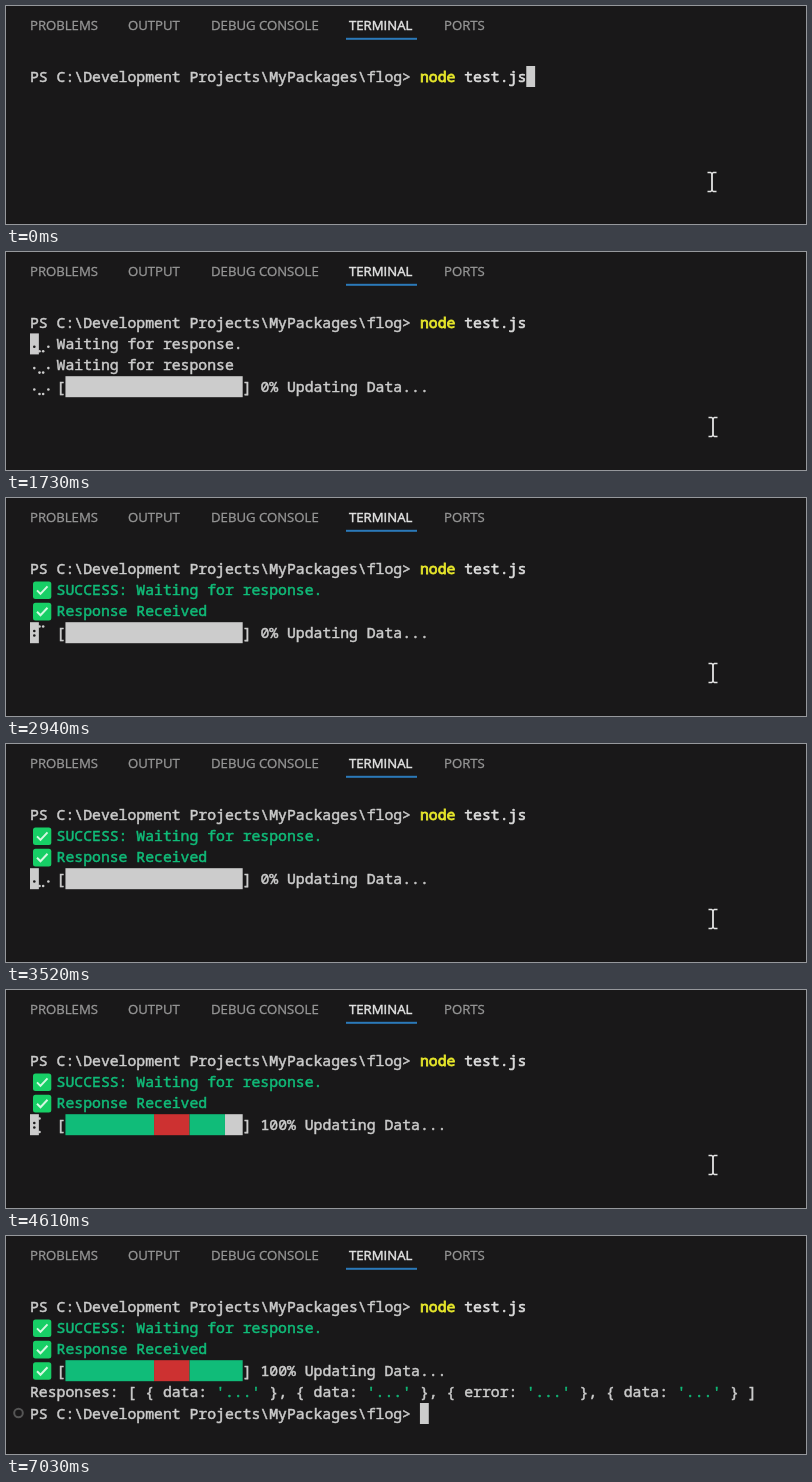
An HTML page with a canvas for the animation above (7.09 s loop, 800 px wide and 218 px high).

```html
<!DOCTYPE html>
<html lang="en">
<head>
<meta charset="utf-8">
<title>Terminal progress demo</title>
<style>
  html, body { margin: 0; width: 100%; height: 100%; overflow: hidden; background: #191819; }
  canvas { display: block; }
</style>
</head>
<body>
<canvas id="stage" width="800" height="218"></canvas>
<script>
const ctx = document.getElementById('stage').getContext('2d');

const LOOP = 7090, LEFT = 24, TOP = 59.6, CELL = 8.862, ROW = 21.4;
const COLOR = {
  back: '#191819', text: '#cccccc', dim: '#969696', bright: '#e4e4e4', accent: '#2b79b9',
  yellow: '#e9e92b', green: '#10bc79', red: '#cd3131', check: '#17cf66', ring: '#555555'
};
const MONO = '500 14.77px "Noto Sans Mono", monospace';
const SANS = '13.15px "Open Sans", sans-serif';
const PROMPT = 'PS C:\\Development Projects\\MyPackages\\flog> ';
const TABS = [['PROBLEMS', 24], ['OUTPUT', 122], ['DEBUG CONSOLE', 205], ['TERMINAL', 343], ['PORTS', 438]];
const SPINNER = ['⢎⠀', '⠎⠁', '⠊⠑', '⠈⠱', '⠀⡱', '⢀⡰', '⢄⡠', '⢆⡀'];
// Column and row of each braille dot, in bit order
const DOTS = [[0, 0], [0, 1], [0, 2], [1, 0], [1, 1], [1, 2], [0, 3], [1, 3]];

const TICK = 109.4, TICK_ORIGIN = 1053;
const tickTime = n => TICK_ORIGIN + n * TICK;
const TIME = {
  mouseMove: 760, enter: 1090, start: tickTime(3), first: tickTime(14), second: tickTime(16),
  done: tickTime(33) + 35, mouseHide: 5820
};

const colX = col => LEFT + col * CELL;
const rowY = row => TOP + row * ROW;

function rect(x, y, w, h, color) {
  ctx.fillStyle = color;
  ctx.fillRect(x, y, w, h);
}

// A thin outline thickens the strokes of the letters
function label(text, x, y, font, color, outline) {
  ctx.font = font;
  ctx.fillStyle = ctx.strokeStyle = color;
  ctx.lineWidth = outline;
  ctx.fillText(text, x, y);
  ctx.strokeText(text, x, y);
}

function write(row, col, text, color = COLOR.text, outline = 0.5) {
  label(text, colX(col), rowY(row) + 16, MONO, color, outline);
}

function cells(row, from, to, color) {
  rect(colX(from), rowY(row) + 0.4, (to - from) * CELL, ROW - 0.4, color);
}

const cursor = (row, col) => cells(row, col, col + 1, COLOR.text);

function line(points, color, width) {
  ctx.strokeStyle = color;
  ctx.lineWidth = width;
  ctx.beginPath();
  points.forEach(([x, y]) => ctx.lineTo(x, y));
  ctx.stroke();
}

function drawTabs() {
  for (const [name, x] of TABS) {
    const active = name === 'TERMINAL';
    label(name, x, 24, SANS, active ? COLOR.bright : COLOR.dim, active ? 0.45 : 0.3);
  }
  rect(340, 31.8, 71, 2, COLOR.accent);
}

function drawCheck(row) {
  const y = rowY(row) + 2.4;
  ctx.fillStyle = COLOR.check;
  ctx.beginPath();
  ctx.roundRect(27, y, 18.3, 17.6, 2.5);
  ctx.fill();
  line([[31, y + 9], [34.5, y + 12.5], [41.5, y + 5]], '#d4f8e1', 2);
}

function drawSpinner(row, tick, underCursor) {
  if (underCursor) cursor(row, 0);
  [...SPINNER[tick % 8]].forEach((char, i) => {
    const bits = char.charCodeAt(0) - 0x2800;
    DOTS.forEach(([c, r], bit) => {
      if (!(bits >> bit & 1)) return;
      const x = 28.3 + i * CELL + c * 5.2, y = rowY(row) + 4.7 + r * 4.5;
      ctx.fillStyle = underCursor && x < colX(1) ? COLOR.back : COLOR.text;
      ctx.beginPath();
      ctx.arc(x, y, 1.3, 0, 7);
      ctx.fill();
    });
  });
}

function drawBar(tick) {
  const filled = Math.max(0, Math.min(20, (tick - 23) * 2));
  const percent = tick < 24 ? 0 : tick < 26 ? 30 : tick < 28 ? 60 : tick < 30 ? 80 : 100;
  const segment = (from, to, color) => {
    const end = Math.min(to, filled);
    if (end > from) cells(3, 4 + from, 4 + end, color);
  };
  write(3, 3, '[');
  cells(3, 4 + filled, 24, COLOR.text);
  segment(0, 10, COLOR.green);
  segment(10, 14, COLOR.red);
  segment(14, 20, COLOR.green);
  write(3, 24, `] ${percent}% Updating Data...`);
}

function drawResponses() {
  const items = ['data', 'data', 'error', 'data'];
  let col = 0;
  const put = (text, color) => {
    write(4, col, text, color);
    col += text.length;
  };
  put('Responses: [ ');
  items.forEach((key, i) => {
    put(`{ ${key}: `);
    put("'...'", COLOR.green);
    put(i < items.length - 1 ? ' }, ' : ' } ]');
  });
}

function drawTasks(t) {
  const tick = Math.floor((t - TICK_ORIGIN) / TICK);
  const finished = [t >= TIME.first, t >= TIME.second, t >= TIME.done];
  const active = finished.indexOf(false);
  finished.forEach((ok, i) => ok ? drawCheck(i + 1) : drawSpinner(i + 1, tick, i === active));

  if (finished[0]) write(1, 3, 'SUCCESS: Waiting for response.', COLOR.green);
  else write(1, 3, 'Waiting for response.');
  if (finished[1]) write(2, 3, 'Response Received', COLOR.green);
  else write(2, 3, 'Waiting for response');
  drawBar(tick);

  if (finished[2]) {
    drawResponses();
    write(5, 0, PROMPT);
    cursor(5, PROMPT.length);
    ctx.strokeStyle = COLOR.ring;
    ctx.lineWidth = 2;
    ctx.beginPath();
    ctx.arc(12.5, 177, 4.3, 0, 7);
    ctx.stroke();
  }
}

function drawMouse(x, y) {
  line([[x, y - 9], [x, y + 9]], COLOR.bright, 1.8);
  for (const side of [-1, 1]) {
    line([[x - 4.5, y + side * 9.5], [x - 1.5, y + side * 9.5], [x, y + side * 8.5],
          [x + 1.5, y + side * 9.5], [x + 4.5, y + side * 9.5]], COLOR.bright, 1.5);
  }
}

function draw(t) {
  rect(0, 0, 800, 218, COLOR.back);
  drawTabs();
  write(0, 0, PROMPT);
  write(0, PROMPT.length, 'node', COLOR.yellow, 0.8);
  write(0, PROMPT.length + 5, 'test.js', '#dedede', 0.6);

  if (t < TIME.enter) cursor(0, PROMPT.length + 12);
  else if (t < TIME.start) cursor(1, 0);
  else drawTasks(t);

  if (t < TIME.mouseMove) drawMouse(706, 176);
  else if (t < TIME.mouseHide) drawMouse(707, 175);
}

const begin = performance.now();
function frame() {
  draw((performance.now() - begin) % LOOP);
  requestAnimationFrame(frame);
}
frame();
</script>
</body>
</html>
```
